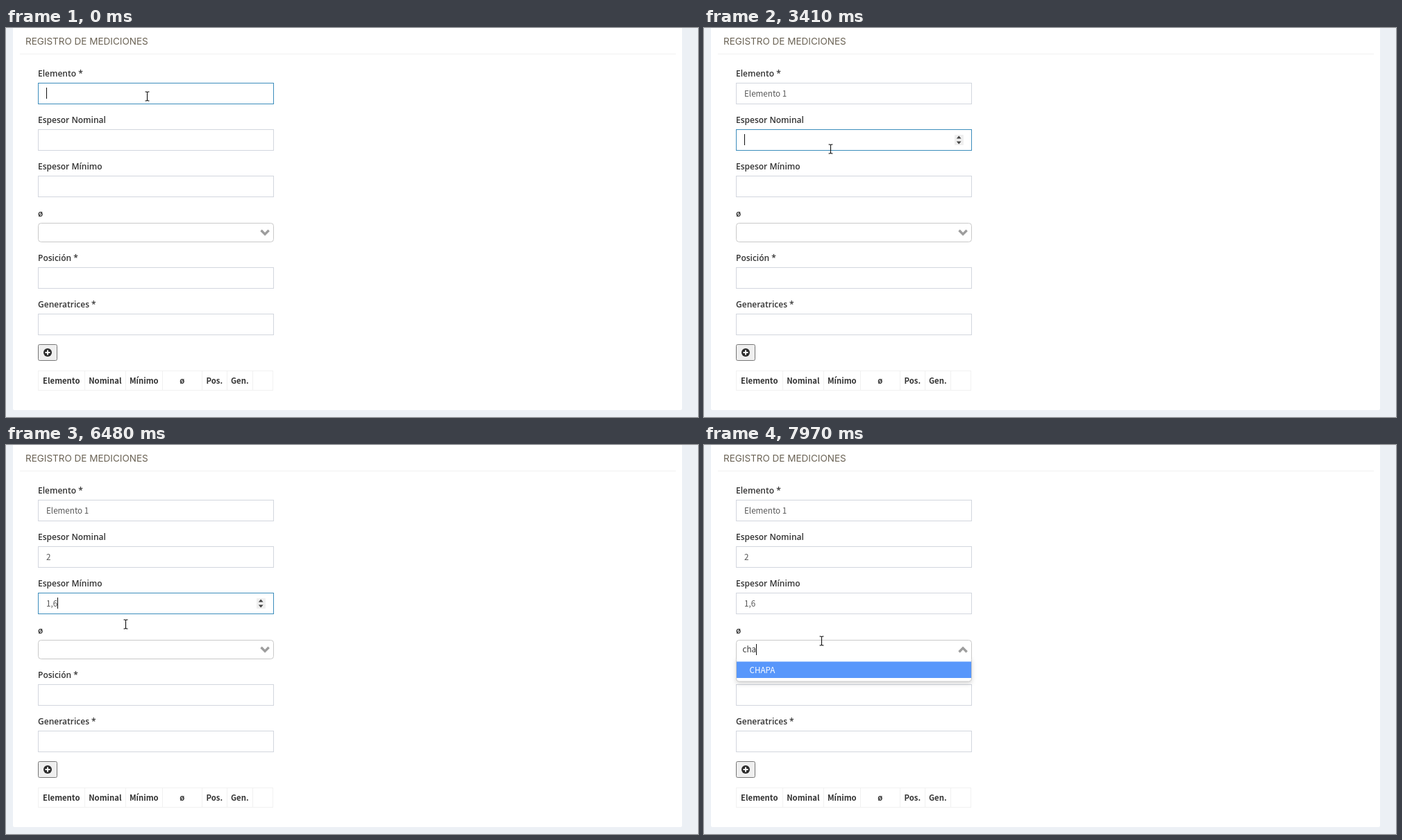
An HTML page for the animation above (8 s loop, 997 by 561 pixels).

```html
<!DOCTYPE html>
<html lang="es">
<head>
<meta charset="utf-8">
<title>Registro de mediciones</title>
<style>
  html, body { margin: 0; width: 100%; height: 100%; overflow: hidden; background: #ecf0f5; }
  svg { display: block; }
  text { white-space: pre; }
  .title { font: 400 13.5px Inter, sans-serif; fill: #6b6355; }
  .label { font: 600 12px "Open Sans", sans-serif; fill: #333; }
  .value, .option, .head { font: 400 11.64px "Noto Sans CJK SC", "Noto Sans CJK JP", "Noto Sans", sans-serif; }
  .value { fill: #555; }
  .option { fill: #333; }
  .head { font-size: 11.3px; font-weight: 700; fill: #333; text-anchor: middle; }
  .panel { filter: drop-shadow(0 3px 3px rgba(0, 0, 0, .15)); }
</style>
</head>
<body>
<svg id="stage" width="997" height="561" viewBox="0 0 997 561"></svg>
<script>
const LOOP = 8000;
const stage = document.getElementById('stage');

function add(parent, tag, attrs = {}, content) {
  const el = document.createElementNS('http://www.w3.org/2000/svg', tag);
  for (const key in attrs) el.setAttribute(key, attrs[key]);
  if (content !== undefined) el.textContent = content;
  parent.appendChild(el);
  return el;
}
const rect = (parent, x, y, width, height, attrs) => add(parent, 'rect', { x, y, width, height, ...attrs });
const text = (parent, x, y, cls, content) => add(parent, 'text', { x, y, class: cls }, content);
const show = (el, on) => el.setAttribute('visibility', on ? 'inherit' : 'hidden');
const clamp = v => Math.max(0, Math.min(1, v));

// Latest entry of a [time, value] list that has been reached.
function at(track, t) {
  let value = track[0][1];
  for (const [time, v] of track) if (t >= time) value = v;
  return value;
}

// Page and card
rect(stage, 0, 0, 997, 561, { fill: '#ecf0f5' });
rect(stage, 10, -4, 964, 555, { fill: '#fff', rx: 2 });
text(stage, 28, 23.5, 'title', 'REGISTRO DE MEDICIONES');
rect(stage, 20, 37, 945, 1, { fill: '#f1f1f1' });

// Form fields
function field(label, top) {
  text(stage, 46, top - 9, 'label', label);
  const box = rect(stage, 46.5, top + .5, 339, 30, { fill: '#fff', stroke: '#d2d6de' });
  const glow = rect(stage, 46.5, top + .5, 339, 30, { fill: 'none', stroke: '#3c8dbc' });
  glow.setAttribute('opacity', 0);
  const value = text(stage, 58, top + 20, 'value', '');
  const spinner = add(stage, 'g', { visibility: 'hidden' });
  rect(spinner, 361, top + 8, 13, 15, { fill: '#efefef', rx: 1 });
  add(spinner, 'path', { d: `M363.8 ${top + 13.5}l3.4-4 3.4 4zm0 4h6.8l-3.4 4z`, fill: '#444' });
  return { top, x: 58, glow, value, spinner };
}
const element = field('Elemento *', 79);
const nominal = field('Espesor Nominal', 146);
const minimum = field('Espesor Mínimo', 213);
text(stage, 46, 272, 'label', 'ø');
field('Posición *', 345);
field('Generatrices *', 412);

// Add button
rect(stage, 46.5, 456.5, 27, 23, { fill: '#efefef', stroke: '#767676', rx: 2 });
add(stage, 'circle', { cx: 60, cy: 468, r: 6, fill: '#2b2b2b' });
add(stage, 'path', { d: 'M56.5 468h7M60 464.5v7', stroke: '#fff', 'stroke-width': 2 });

// Table header
rect(stage, 46.5, 494.5, 338, 28, { fill: 'none', stroke: '#f1f1f1' });
const columns = [46, 113, 172, 225, 282, 318, 355];
['Elemento', 'Nominal', 'Mínimo', 'ø', 'Pos.', 'Gen.'].forEach((name, i) => {
  rect(stage, columns[i + 1], 494, 1, 29, { fill: '#f1f1f1' });
  text(stage, (columns[i] + columns[i + 1]) / 2 + .3, 513, 'head', name);
});

// Select and its drop-down lists
const ROW = 23.6;
function panel(height, rowWidth, options) {
  const g = add(stage, 'g', { opacity: 0 });
  rect(g, 46.5, 305.5, 339, height, { fill: '#fff', stroke: '#c9c9c9', rx: 4, class: 'panel' });
  rect(g, 47, 312.4, rowWidth, ROW, { fill: '#5897fb' });
  options.forEach((name, i) => {
    const item = text(g, 65.5, 328.6 + i * ROW, 'option', name);
    if (!i) item.style.fill = '#fff';
  });
  return g;
}
const sizes = '1/8,1/4,3/8,1/2,3/4,1,1 1/4,1 1/2,2,2 1/2,3'.split(',');
const fullList = panel(290, 323, sizes);
rect(fullList, 370, 309, 15, 252, { fill: '#f1f1f1' });
rect(fullList, 371.5, 323, 11.5, 140, { fill: '#c1c1c1' });
add(fullList, 'path', { d: 'M373.8 318l3.5-4 3.5 4z', fill: '#a0a0a0' });
const filteredList = panel(35.5, 338, ['CHAPA']);

const selectFill = rect(stage, 47, 282, 338, 26, { fill: '#fff' });
const selectBorder = add(stage, 'path', { fill: 'none', stroke: '#c9c9c9' });
const chevron = add(stage, 'path', { fill: 'none', stroke: '#9d9d9d', 'stroke-width': 3.4 });
const search = { top: 279.5, x: 55.5, value: text(stage, 55.5, 299, 'option', '') };
const CLOSED = 'M50.5 281.5H381.5a4 4 0 0 1 4 4V304.500a4 4 0 0 1-4 4H50.500a4 4 0 0 1-4-4V285.500a4 4 0 0 1 4-4z';
const OPEN = 'M46.5 309V285.500a4 4 0 0 1 4-4H381.5a4 4 0 0 1 4 4V309';

const caret = rect(stage, 0, 0, 1, 16, { fill: '#111' });

// Mouse pointers
const beam = add(stage, 'path', {
  d: 'M-3-6.500H-1L0-5.500 1-6.500H3M0-5.500V5.500M-3 6.500H-1L0 5.500 1 6.500H3',
  fill: 'none', stroke: '#111', 'stroke-width': 1.1
});
const arrow = add(stage, 'path', {
  d: 'M.5.5V15.500L4 12.200 6.500 17.300 8.700 16.300 6.300 11.300H11z',
  fill: '#fff', stroke: '#111'
});

// Timing, in ms
const typing = [
  [element, [[0, ''], [50, 'E'], [310, 'El'], [360, 'Ele'], [740, 'Eleme'], [920, 'Elemen'],
    [1100, 'Element'], [1280, 'Elemento'], [1840, 'Elemento '], [2160, 'Elemento 1']]],
  [nominal, [[0, ''], [3840, '2']]],
  [minimum, [[0, ''], [5300, '1'], [5480, '1,'], [5800, '1,6']]],
  [search, [[0, ''], [7540, 'c'], [7840, 'ch'], [7970, 'cha']]]
];
const caretOwner = [[0, element], [1790, null], [1840, element], [2720, null], [3220, nominal],
  [4370, null], [4600, minimum], [5100, null], [5300, minimum], [6730, null], [6980, search]];
const focus = [[element, -1000, 3220], [nominal, 3220, 4530], [minimum, 4530, 7010]];
const spinners = [[nominal, 2850, 4560], [minimum, 4400, 6980]];
const listOpacity = [[0, 0], [7050, .05], [7100, .45], [7160, 1]];

// Each move: start, end, number of steps, destination.
const moves = [[2720, 2910, 4, 182, 172], [3220, 3410, 4, 182, 174], [3910, 4160, 4, 179, 194],
  [4230, 4460, 4, 174, 234], [6480, 6550, 2, 169, 282]];

function mouseAt(t) {
  let x = 203, y = 98;
  for (const [start, end, steps, toX, toY] of moves) {
    if (t < start) break;
    const step = Math.floor((t - start) / (end - start) * (steps - 1) + 1e-6) + 1;
    const p = Math.min(1, step / steps);
    x += (toX - x) * p;
    y += (toY - y) * p;
  }
  return [Math.round(x), Math.round(y)];
}

const smooth = v => { const p = clamp(v); return p * p * (3 - 2 * p); };

function render(t) {
  for (const [owner, track] of typing) {
    const value = at(track, t);
    if (owner.value.textContent !== value) owner.value.textContent = value;
  }
  for (const [owner, on, off] of focus)
    owner.glow.setAttribute('opacity', smooth((t - on) / 150) * (1 - smooth((t - off) / 150)));
  for (const [owner, on, off] of spinners) show(owner.spinner, t >= on && t < off);

  const owner = at(caretOwner, t);
  show(caret, owner);
  if (owner) {
    const width = owner.value.textContent ? owner.value.getComputedTextLength() : 0;
    caret.setAttribute('x', Math.floor(owner.x + width));
    caret.setAttribute('y', Math.floor(owner.top + 7.5));
  }

  const filtered = t >= 7540;
  fullList.setAttribute('opacity', filtered ? 0 : at(listOpacity, t));
  filteredList.setAttribute('opacity', filtered ? 1 : 0);
  const open = t >= 6980;
  selectBorder.setAttribute('d', open ? OPEN : CLOSED);
  selectFill.setAttribute('height', open ? 29 : 26);
  chevron.setAttribute('d', t >= 7100 ? 'M367.5 298.500l5.600-5.600 5.600 5.600' : 'M367.5 291.800l5.600 5.600 5.600-5.600');

  const [x, y] = mouseAt(t);
  const outside = y > 177 && y < 213;
  show(arrow, outside);
  show(beam, !outside);
  arrow.setAttribute('transform', `translate(${x} ${y})`);
  beam.setAttribute('transform', `translate(${x + .5} ${y + .5})`);
}

const origin = performance.now();
function tick() {
  render((performance.now() - origin) % LOOP);
  requestAnimationFrame(tick);
}
tick();
</script>
</body>
</html>
```
